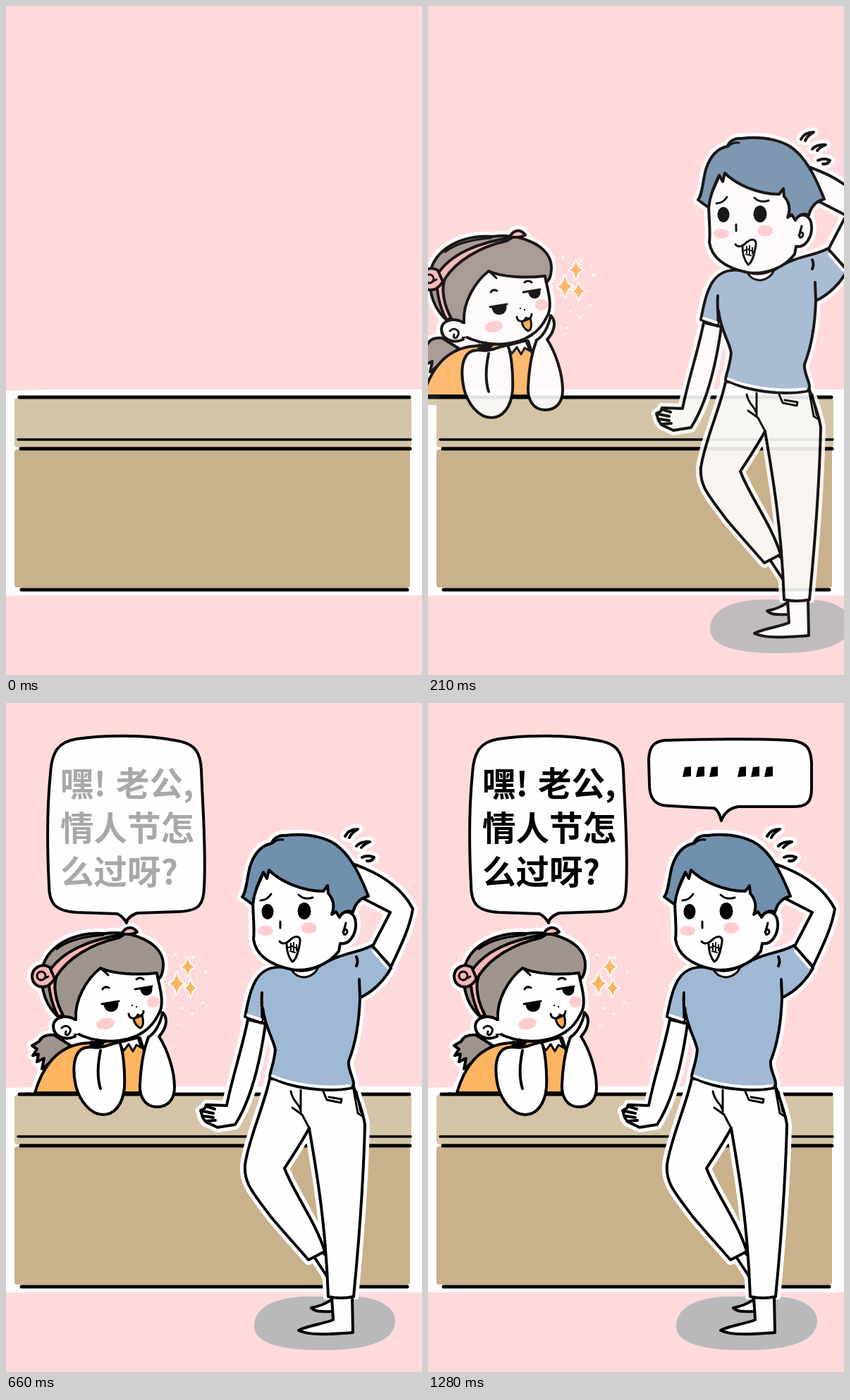
An HTML page for the animation above (1750 ms loop, 590x949 px).

```html
<!DOCTYPE html>
<html lang="zh-CN">
<head>
<meta charset="utf-8">
<title>Counter chat</title>
<style>
  html, body { margin: 0; width: 100%; height: 100%; overflow: hidden; background: #ffdadd; }
  svg { display: block; width: 590px; height: 949px; }
  .ink { stroke: #000; stroke-width: 4; stroke-linecap: round; stroke-linejoin: round; fill: none; }
  .halo { stroke: #fefefe; stroke-width: 14; stroke-linecap: round; stroke-linejoin: round; fill: none; }
  .blush { fill: #ffcdd0; stroke: none; }
  .solid { fill: #000; stroke: none; }
  .thin { stroke-width: 3; }
  text { font: 900 47.5px "Noto Sans CJK SC", "Noto Sans CJK", sans-serif; }
</style>
</head>
<body>
<svg viewBox="0 0 590 949">
  <!-- counter -->
  <path fill="#fefefe" d="M0 546L60 544H590V836H0Z"/>
  <rect x="12" y="556" width="563" height="70" rx="4" fill="#d4c4a7"/>
  <rect x="12" y="629" width="561" height="196" rx="4" fill="#c8b18b"/>
  <g class="ink" stroke-width="5">
    <path style="stroke-width:5" d="M19 555H572M21 628H573M22 828H569"/>
    <path style="stroke-width:3.5" d="M17 615H574"/>
  </g>

  <g id="girl">
    <use href="#girlShape" class="halo"/>
    <!-- covers the halo below the counter edge -->
    <path fill="#d4c4a7" d="M30 557H200V566H30Z"/>
    <path class="ink" style="stroke-width:5" d="M30 555H200"/>
    <g class="ink">
      <g id="girlShape">
        <path fill="#a0948f" d="M68 471C57 470 50 474 47 480L37 486L44 491L38 500L46 498L44 509L54 504L51 519C66 508 78 496 92 486Z"/>
        <path fill="#fdb562" d="M41 553C50 522 68 489 108 483L190 475L198 500L194 553Z"/>
        <path fill="#a0948f" d="M76 447C58 432 48 408 51 378C58 345 95 324 140 327C180 322 222 340 223 370C223 385 219 391 212 395L150 440L100 452Z"/>
        <path fill="#f8b5b8" d="M164 328C168 318 179 315 186 325C181 328 175 328 164 328Z"/>
        <path fill="#f8b5b8" d="M168 328C120 335 78 352 60 383C60 405 65 428 74 445L81 443C71 425 66 402 72 387C88 362 120 342 160 333Z"/>
        <path fill="#f8b5b8" d="M62 375C52 369 38 374 37 387C37 399 47 405 57 402C62 400 66 396 69 391Z"/>
        <path fill="#fefefe" d="M98 449C84 441 68 446 67 458C67 472 82 480 98 473Z"/>
        <path fill="#fefefe" d="M99 449C97 420 115 391 134 376C153 385 188 386 214 383C216 398 227 426 216 442C206 463 186 476 160 479C132 482 110 474 97 467Z"/>
      </g>
      <path stroke="none" fill="#fefefe" d="M91 451H103V469H91Z"/>
      <circle class="thin" cx="50" cy="387" r="6"/>
      <path class="thin" d="M54 391L60 388M79 461C86 454 95 462 90 468C88 473 83 471 85 466M72 349C90 335 115 331 138 329M145 386C140 381 138 379 134 376"/>
      <ellipse class="blush" cx="141" cy="455" rx="13" ry="8" transform="rotate(-10 141 455)"/>
      <ellipse class="blush" cx="209" cy="424" rx="9" ry="8"/>
      <path class="solid" d="M138 426L159 423C161 432 156 438 149 438C142 438 139 433 138 426ZM190 405L207 402C209 410 205 415 199 415C194 415 191 411 190 405Z"/>
      <path class="thin" d="M136 427L160 423M183 406L207 402M137 406Q140 401 146 404M185 392Q190 388 195 392"/>
      <path class="solid" d="M178 428h2v2h-2zM184 430h2v2h-2z"/>
      <path class="thin" fill="#fda94e" d="M181 448L193 443C196 454 194 460 190 461C185 458 182 454 181 448Z"/>
      <path class="thin" d="M174 441C175 449 184 449 187 442C190 445 195 443 195 437"/>
      <path class="thin" fill="#fefefe" d="M160 482L167 493L174 484L180 494L185 485L192 489L187 475Z"/>
      <path fill="#fefefe" d="M222 439C232 449 225 465 217 473C228 490 239 520 239 545C239 562 230 573 214 573C197 573 189 558 190 541C191 515 196 490 202 474C211 469 219 455 222 439Z"/>
      <path fill="#fefefe" d="M120 488C136 491 145 484 161 481C166 492 169 520 168 545C166 570 153 584 138 584C119 584 104 563 99 543C94 520 95 494 112 489Z"/>
      <path d="M134 493C130 512 129 531 134 547"/>
      <path class="solid" d="M119 478L126 481L130 475L133 481L142 480L137 486L143 489L126 489L117 485L123 483Z"/>
    </g>
    <!-- sparkles -->
    <g fill="#fbb45f" stroke="#fefefe" stroke-width="5" stroke-linejoin="round" paint-order="stroke">
      <path id="star" d="M242 383Q244 395 252 398Q244 401 242 413Q240 401 232 398Q240 395 242 383Z"/>
      <use href="#star" transform="translate(40 36) scale(.9 .85)"/>
      <use href="#star" transform="translate(68 86) scale(.8)"/>
    </g>
    <path stroke="#fefefe" stroke-width="4.5" stroke-linecap="round" d="M240 357h.1M265 361h.1M283 382h.1M279 425h.1M264 441h.1M245 457h.1M250 432h.1"/>
  </g>

  <g id="man">
    <path fill="#b9b9bb" d="M352 884C352 860 375 845 420 842H490C530 842 552 858 552 876C552 905 515 917 455 918C390 919 352 908 352 884Z"/>
    <use href="#manShape" class="halo"/>
    <path fill="#b9b9bb" d="M424 846H460V872H424ZM493 846H508V872H493Z"/>
    <g class="ink">
      <path fill="#fefefe" d="M462 846C454 852 443 856 433 858C440 865 452 863 464 863Z"/>
      <path fill="#fefefe" d="M462 842L464 875C449 881 424 884 415 890C432 898 464 895 492 893L491 842Z"/>
      <g id="manShape">
        <path class="sweat" d="M481 189Q486 179 499 179Q490 184 487 191M497 203Q503 196 516 197Q508 200 504 205M505 219Q514 215 522 219Q519 225 512 224"/>
        <path fill="#fefefe" d="M436 784L457 816L456 786L446 776Z"/>
        <path fill="#fefefe" d="M374 533C366 572 344 618 339 655C337 681 350 694 375 728C395 752 418 777 429 790L452 778C440 737 408 695 395 660C408 640 420 622 430 603C439 658 453 730 457 842Q475 846 493 842C500 770 507 680 509 598C506 578 498 560 492 541Z"/>
        <path fill="#fefefe" d="M343 449C335 490 321 530 313 571L284 570L282 575L276 578L279 588L283 594L300 602L325 598C346 565 360 513 368 455Z"/>
        <path fill="#fefefe" d="M494 229C517 237 558 255 577 292C572 322 557 350 546 374L520 345L545 297L500 274Z"/>
        <path fill="#9fb9d4" d="M404 377C378 370 360 379 351 400C344 415 342 430 339 445L363 454L364 432C367 460 379 475 382 492C380 512 375 520 374 530C404 547 456 553 491 546C498 538 484 522 486 508C497 480 501 450 502 418C520 410 536 394 546 376L519 344C500 355 475 353 442 375Z"/>
        <path fill="#fefefe" d="M350 275C350 302 353 320 351 335C354 356 372 371 405 378C430 382 458 371 472 352L474 341C488 344 497 326 496 312C495 297 483 292 474 301L462 250L370 230Z"/>
        <path fill="#7090ad" d="M335 275C341 268 341 252 346 232C352 213 362 202 377 199C379 192 387 187 396 188C429 184 459 191 474 206C492 222 504 249 514 274C501 277 495 285 492 297C486 293 477 296 473 304L468 296L462 300C466 290 465 279 457 270L456 259L450 267C421 267 390 254 373 237L370 249L365 240C359 253 352 267 350 286Z"/>
      </g>
      <!-- shirt details -->
      <path stroke="#fefefe" d="M343 443L361 449M378 529C406 542 456 548 487 543M541 375L521 352"/>
      <path fill="#fefefe" class="thin" d="M405 378C414 395 437 391 443 374C432 380 418 382 405 378Z"/>
      <path d="M363 411C362 425 363 435 364 446M501 392L502 418M497 360Q500 367 497 373"/>
      <path class="thin" d="M378 199Q384 193 393 194"/>
      <!-- face -->
      <ellipse class="blush" cx="368" cy="323" rx="11" ry="7"/>
      <ellipse class="blush" cx="430" cy="319" rx="11" ry="8"/>
      <ellipse class="solid" cx="371" cy="296" rx="8.5" ry="11"/>
      <ellipse class="solid" cx="423" cy="295" rx="9.5" ry="12"/>
      <path class="thin" d="M361 280Q370 280 376 271M415 272Q423 280 435 276M389 310V319M481 318C477 327 479 331 483 327C486 322 481 318 478 325M482 312L479 323"/>
      <path class="thin" fill="#fefefe" d="M388 338C392 344 400 340 404 335C412 329 418 331 417 339C415 352 411 365 406 367C401 361 398 351 398 341"/>
      <path style="stroke-width:2" d="M400 347L406 345L413 348M404 341V350M408 340V353M412 343V351M403 352L410 354"/>
      <!-- hand and trousers -->
      <path d="M284 572L296 576M279 579L294 582M281 586L294 588M285 593L297 592"/>
      <path class="thin" d="M418 549V583M404 551C407 566 416 569 417 576M406 574L420 584L430 603M450 551L455 563L475 567L476 562L458 559M492 543L499 582L507 587M497 551L503 580"/>
    </g>
  </g>

  <g id="ask">
    <path class="ink" fill="#fefefe" style="fill:#fefefe" d="M100 51C140 45 200 45 240 53C268 57 276 70 277 95C279 150 284 210 281 262C280 288 272 295 245 296L186 298Q172 303 171 312Q166 303 158 299L100 297C70 295 61 285 61 258C58 200 58 150 63 100C65 68 75 55 100 51Z"/>
    <g id="askText">
      <text x="77" y="132">嘿!</text>
      <text x="156" y="132">老公,</text>
      <text x="77" y="195">情人节怎</text>
      <text x="77" y="257">么过呀?</text>
    </g>
  </g>

  <g id="reply">
    <path class="ink" style="fill:#fefefe" d="M335 53C400 51 470 51 515 53C538 56 543 65 544 85V122C544 142 536 147 518 147H440Q422 150 416 167Q412 151 405 149C380 148 350 147 333 145C318 142 314 130 314 115L313 80C314 62 320 55 335 53Z"/>
    <g id="dots">
      <path id="trio" d="M364 91L373 90V104L361 105ZM383 91L392 90V104L380 105ZM402 91L411 90V104L399 105Z"/>
      <use href="#trio" x="78"/>
    </g>
  </g>
</svg>
<script>
  const LOOP = 1750, TICK = 30;
  const el = id => document.getElementById(id);
  const [girl, man, ask, askText, reply, dots] =
    ['girl', 'man', 'ask', 'askText', 'reply', 'dots'].map(el);

  // progress 0..1 in n equal ticks, the first one at `start`
  const steps = (t, start, n) =>
    Math.max(0, Math.min(n, Math.floor((t - start) / TICK) + 1)) / n;

  const show = (node, on) => node.style.display = on ? '' : 'none';

  function draw() {
    const t = performance.now() % LOOP;
    const enter = steps(t, 30, 10);
    const shift = 160 * (1 - enter);
    const alpha = Math.sin(enter * Math.PI / 2);
    girl.setAttribute('transform', `translate(${-shift})`);
    man.setAttribute('transform', `translate(${shift})`);
    girl.style.opacity = man.style.opacity = alpha;
    show(ask, t >= 470);
    askText.style.opacity = steps(t, 630, 6);
    show(reply, t >= 910);
    dots.style.opacity = steps(t, 1040, 9);
    requestAnimationFrame(draw);
  }
  draw();
</script>
</body>
</html>
```
